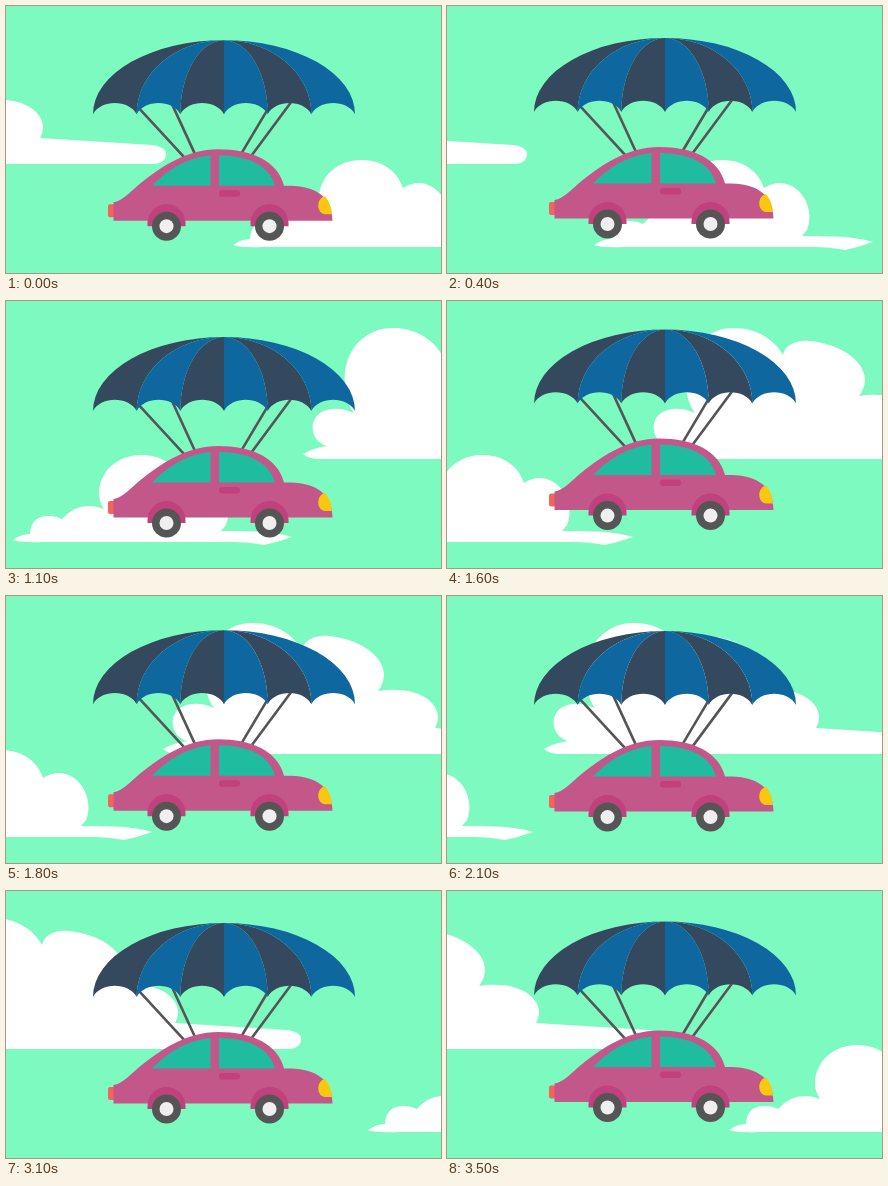
These frames come from a looping animation (435x267 px, 3600 ms). An HTML page:

```html
<!DOCTYPE html>
<html lang="en">
<head>
<meta charset="utf-8">
<title>Parachuting car</title>
<style>
  html, body { margin: 0; width: 100%; height: 100%; overflow: hidden; background: #7dfac0; }
  svg { display: block; width: 435px; height: 267px; }
</style>
</head>
<body>
<svg viewBox="0 0 435 267">
  <defs>
    <path id="high" d="M0 153Q10 147 24 145C14 142 8 133 10 122C14 107 34 104 51 112C40 97 40 74 44 61C51 40 68 27 90 27
      C112 27 130 38 139 54C141 44 152 39 165 40C195 42 222 60 221 80Q220 89 215 95Q226 93 236 94C262 95 283 112 272 132
      L384 139Q399 141 398 149Q397 158 384 158H14Q4 157 0 153Z"/>
    <path id="low" d="M0 239Q8 233 17 233Q18 215 35 215Q43 215 49 218Q60 205 76 205Q84 205 91 208Q86 200 86 193
      C86 170 105 154 128 154C148 154 164 164 170 182Q178 177 186 177C209 178 221 205 213 224L208 230
      Q260 229 279 236Q265 241 251 244Q236 241 222 241H30Q8 242 0 239Z"/>
    <g id="wheel">
      <path d="M-19 0v-3a19 19 0 0 1 38 0v3z" fill="#c0417c"/>
      <circle r="14.5" fill="#555"/>
      <circle r="7" fill="#f0eeee"/>
    </g>
  </defs>
  <g id="clouds" fill="#fff">
    <use href="#high" x="517"/>
    <use href="#high" x="-238"/>
    <use href="#low" x="227"/>
    <use href="#low" x="982"/>
  </g>
  <g id="flyer">
    <path d="M132 101L179 152M166 98L189 148M285 96L245 150M263 101L235 148" stroke="#555" stroke-width="2.6"/>
    <g id="canopy"></g>
    <rect x="102" y="198" width="9" height="13" rx="2" fill="#f4645a"/>
    <path d="M107.500 214.500V196Q114 195 122 188C152 160 182 143 212 143C246 143 272 155 278 179.500
      C304 179 326 186 326.500 214.500Z" fill="#c4578a"/>
    <path d="M146 179.500C163 162 182 151 204.500 149V179.500ZM213 149C243 149 264 160 269 179.500H213Z" fill="#1fbc9f"/>
    <rect x="213" y="184" width="21" height="6.500" rx="3" fill="#c0417c"/>
    <path d="M319 190C310 192 310 207 319 208H326Q325 197 319 190Z" fill="#f9c80e"/>
    <use href="#wheel" x="160.500" y="220"/>
    <use href="#wheel" x="263.500" y="220"/>
  </g>
</svg>
<script>
const LOOP = 3600, STEP = 100, BOB = 900, SPEED = 0.2;
const clouds = document.getElementById('clouds');
const flyer = document.getElementById('flyer');

// Six panels between elliptical seams that meet at the apex.
const seam = i => Math.abs(i - 3) * 43.67;
const tip = i => 218 + (i - 3) * 43.67;
let panels = '';
for (let i = 0; i < 6; i++) {
  const side = i < 3 ? 0 : 1;
  panels += `<path fill="${i % 2 ? '#0f679f' : '#34495e'}" d="M218 34
    A${seam(i)} 74 0 0 ${side} ${tip(i)} 108c8 -15 35.670 -15 43.670 0
    A${seam(i + 1)} 74 0 0 ${1 - side} 218 34Z"/>`;
}
document.getElementById('canopy').innerHTML = panels;

const ease = u => u < 0.5 ? (2 * u) ** 2.5 / 2 : 1 - (2 - 2 * u) ** 2.5 / 2;

// Vertical drift: lowest at 170 ms, highest half a period later.
function bob(t) {
  const u = ((t - 170 + BOB) % BOB) / BOB * 2;
  return 2.1 - 7.8 * ease(u < 1 ? u : 2 - u);
}

function draw(now) {
  const t = Math.floor(now % LOOP / STEP) * STEP;
  clouds.setAttribute('transform', `translate(${-SPEED * t} 0)`);
  flyer.setAttribute('transform', `translate(0 ${bob(t)})`);
  requestAnimationFrame(draw);
}
draw(performance.now());
</script>
</body>
</html>
```
